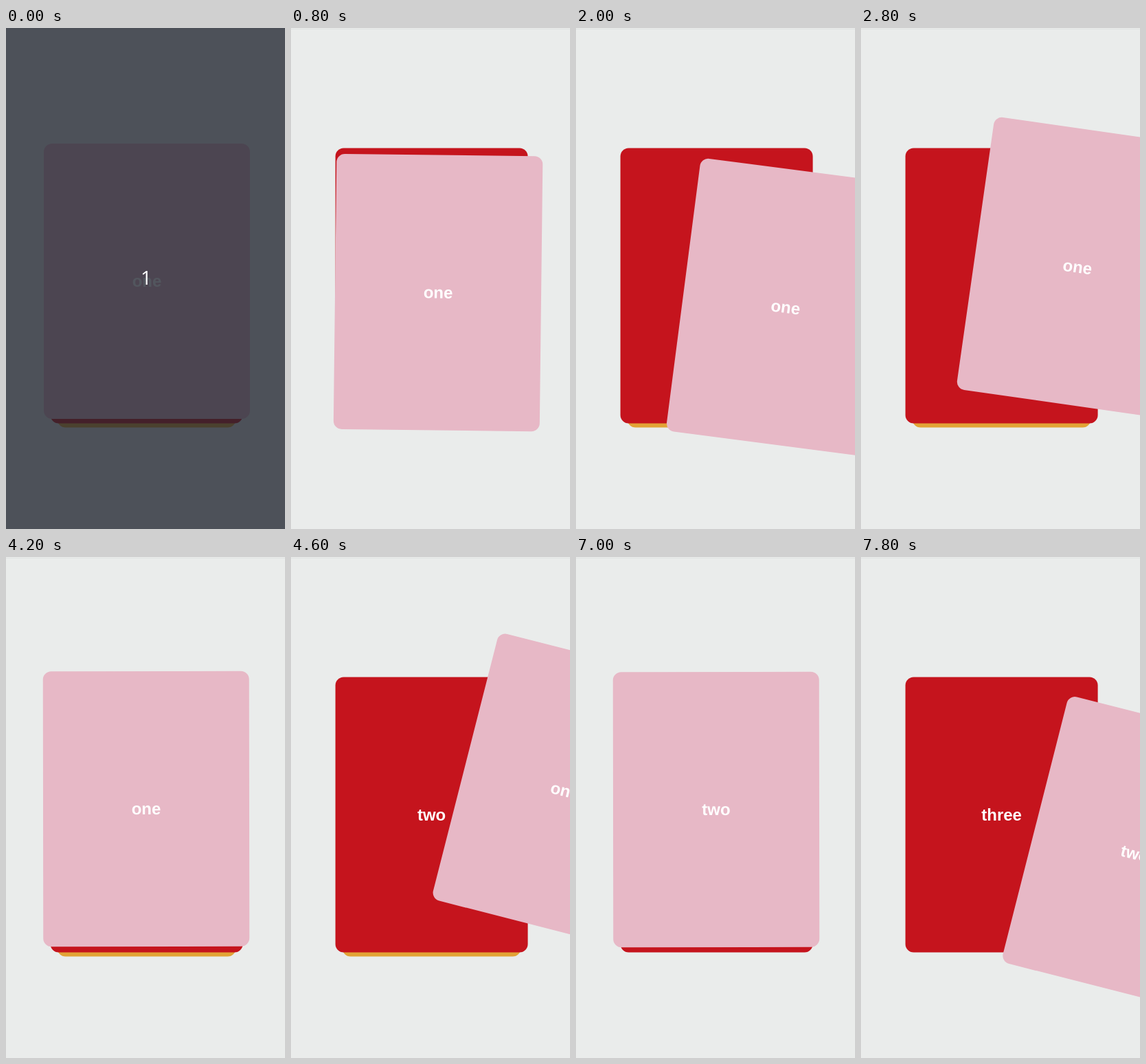
Recreate the animation shown at these times as an HTML page. Size 406x728 px, loop 8 s.

```html
<!DOCTYPE html>
<html lang="en">
<head>
<meta charset="utf-8">
<title>Swipe deck</title>
<style>
  html, body { margin: 0; width: 100%; height: 100%; overflow: hidden; background: #eaeceb; }
  #stage { position: relative; width: 406px; height: 728px; overflow: hidden; background: #eaeceb; }
  #stage div { position: absolute; box-sizing: border-box; display: flex; align-items: center; justify-content: center; }
  #stage .rule { left: 0; top: 1px; width: 100%; height: 1px; background: #dfe2e1; }
  .card { height: 400px; border-radius: 12px; color: #fff; font: bold 24px "Liberation Sans", Arial, sans-serif; }
  #back { left: 75px; top: 181px; width: 260px; background: #e2a336; }
  #middle { left: 65px; top: 175px; width: 280px; background: #c5141d; }
  #back, #middle { transform: translate(-.4px, -.4px); }
  #front { left: 55px; top: 168px; width: 300px; background: #e7b8c6; }
  #countdown { inset: 0; padding: 0 0 4px 2px; background: rgba(30, 36, 46, .77); color: #fff; font: 28px "Open Sans", sans-serif; }
</style>
</head>
<body>
<div id="stage">
  <div class="rule"></div>
  <div class="card" id="back"></div>
  <div class="card" id="middle"></div>
  <div class="card" id="front"></div>
  <div id="countdown">1</div>
</div>
<script>
const LOOP = 8000, STEP = 100;
const COUNTDOWN_END = 100, RELEASE = 2895, SWIPE = 4200, NEXT_CARD = 5300, SECOND_DRAG = 7000;
const DEGREES_PER_PX = 15 / 203;

// Turning points of the first drag
const turns = [
  { at: 700, x: 0, y: 0 },
  { at: 1000, x: 35, y: 64 },
  { at: 1300, x: 50.4, y: 82 },
  { at: 2000, x: 100, y: 38 },
  { at: 2400, x: 75, y: 88 },
  { at: 2800, x: 110, y: -20.5 }
];

const el = id => document.getElementById(id);
const back = el('back'), middle = el('middle'), front = el('front'), countdown = el('countdown');

const progress = (t, from, to) => Math.min(1, Math.max(0, (t - from) / (to - from)));
const ease = k => k * k * (3 - 2 * k);
const mix = (a, b, k) => a + (b - a) * k;

// Remaining share of the offset in an underdamped spring
function spring(ms) {
  const s = Math.max(0, ms) / 1000, decay = 11, freq = 10.45;
  return Math.exp(-decay * s) * (Math.cos(freq * s) + decay / freq * Math.sin(freq * s));
}

function wander(t) {
  const next = Math.max(1, turns.findIndex(turn => turn.at >= t));
  const i = t > turns.at(-1).at ? turns.length - 1 : next;
  const a = turns[i - 1], b = turns[i];
  const k = ease(progress(t, a.at, b.at)), left = spring(t - RELEASE);
  return [mix(a.x, b.x, k) * left, mix(a.y, b.y, k) * left];
}

function swipeOut(t) {
  const k = progress(t, SWIPE, 4900);
  return [mix(-1, 450, k ** 1.5), mix(-2, -45, ease(k))];
}

// Arcs upward before sinking to the right
function secondDrag(t) {
  const k = progress(t, SECOND_DRAG, 7800);
  return [mix(-1, 193.5, ease(k)), mix(-1, 63.3, k * k) - 28 * Math.sin(Math.PI * k)];
}

function offsetAt(t) {
  if (t < SWIPE) return wander(t);
  if (t < NEXT_CARD) return swipeOut(t);
  return t < SECOND_DRAG ? [0, 0] : secondDrag(t);
}

function draw(now) {
  const t = Math.floor(now % LOOP / STEP) * STEP;
  const [x, y] = offsetAt(t);
  const second = t >= NEXT_CARD;
  front.textContent = second ? 'two' : 'one';
  middle.textContent = second ? 'three' : 'two';
  back.style.visibility = second ? 'hidden' : 'visible';
  countdown.style.visibility = t < COUNTDOWN_END ? 'visible' : 'hidden';
  front.style.transform = x || y ? `translate(${x}px, ${y}px) rotate(${x * DEGREES_PER_PX}deg)` : 'none';
}

let start;
function tick(now) {
  start ??= now;
  draw(now - start);
  requestAnimationFrame(tick);
}
draw(0);
requestAnimationFrame(tick);
</script>
</body>
</html>
```
